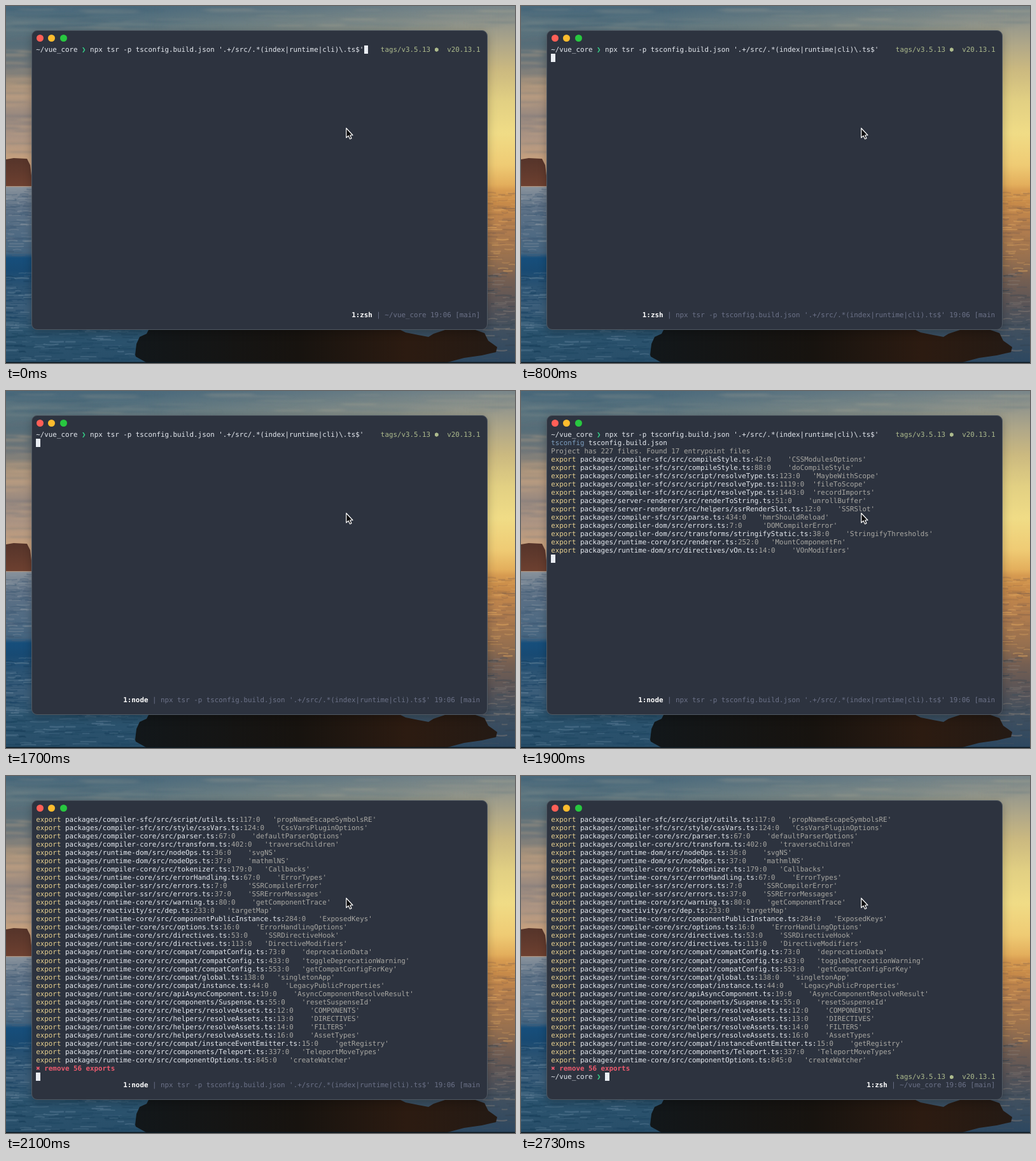
These frames come from a looping animation (800 px wide and 561 px high, 2.86 s). An HTML page:

```html
<!DOCTYPE html>
<html lang="en">
<head>
<meta charset="utf-8">
<title>Terminal session</title>
<style>
  html, body { margin: 0; width: 100%; height: 100%; overflow: hidden; background: #2d333f; }
  #stage { position: relative; width: 800px; height: 561px; overflow: hidden; }
  #stage > * { position: absolute; }
  .fill { inset: 0; }
  .cool { background: linear-gradient(#48687b 0, #5c757f 30px, #566d78 60px, #74797a 95px,
    #a5917b 122px, #b69a80 142px, #97887f 172px, #aa9383 205px, #c5a07e 240px, #bb9477 283px,
    #87919b 285px, #5d7186 320px, #456580 388px, #164e7b 396px, #184a73 415px, #2b5373 440px,
    #3b5d79 475px, #2c546f 510px, #284e69 561px); }
  .warm { background: linear-gradient(#78868a 0, #97988c 30px, #b1a888 62px, #cbb980 100px,
    #e2d083 150px, #f0dc86 200px, #efcb74 250px, #e3ae5c 281px, #d69a50 290px, #c78a49 310px,
    #b27d4e 350px, #956f4f 400px, #755f52 430px, #595457 470px, #3f4f5f 512px, #2c4760 561px);
    -webkit-mask-image: linear-gradient(90deg, transparent 25%, #000 97%);
    mask-image: linear-gradient(90deg, transparent 25%, #000 97%); }
  #window { left: 40px; top: 38px; width: 717px; height: 470.5px; box-sizing: border-box;
    border: 1px solid #505963; border-radius: 9px; background: #2d333f;
    box-shadow: 0 4px 14px rgba(0, 0, 0, .25); }
  .light { width: 11px; height: 11px; border-radius: 50%; top: 44.8px; }
  .screen { left: 47.3px; top: 61.7px; opacity: 0; color: #e6eaf0;
    font: 10.838px/13.05px "DejaVu Sans Mono", "Liberation Mono", monospace;
    text-rendering: geometricPrecision; font-variant-ligatures: none; }
  .screen, .screen span { position: absolute; white-space: pre; }
  .key { color: #e7d08f; }
  .note { color: #a9a8a3; }
  .blue { color: #7e9fc0; }
  .tag { color: #adbb8d; }
  .arrow { color: #35d48a; font-weight: bold; }
  .error { color: #ec5a6e; font-weight: bold; }
  .tab { color: #fff; font-weight: bold; }
  .dim { color: #6c7288; }
  .caret { width: 6.6px; height: 13.05px; background: #e9edf3; }
  .hex { width: 6px; height: 6.6px; margin-top: 3.6px; background: #adbb8d;
    clip-path: polygon(50% 0, 100% 25%, 100% 75%, 50% 100%, 0 75%, 0 25%); }
</style>
</head>
<body>
<div id="stage">
  <div class="fill cool"></div>
  <div class="fill warm"></div>
  <svg class="fill" width="800" height="561">
    <defs>
      <filter id="soft" x="-20%" y="-20%" width="140%" height="140%"><feGaussianBlur stdDeviation="5 1.6"/></filter>
      <linearGradient id="rock">
        <stop offset="0" stop-color="#12171a"/><stop offset=".45" stop-color="#17130f"/>
        <stop offset=".75" stop-color="#2c1b11"/><stop offset="1" stop-color="#241a14"/>
      </linearGradient>
      <linearGradient id="cliff" x1="0" y1="0" x2="0" y2="1">
        <stop offset="0" stop-color="#55342a"/><stop offset="1" stop-color="#6d4030"/>
      </linearGradient>
    </defs>
    <g id="clouds" fill="none" stroke-linecap="round" filter="url(#soft)"></g>
    <path d="M0 241L12 239L33 240L38 250L42 283H0Z" fill="url(#cliff)"/>
    <g id="waves" fill="none" stroke-linecap="round"></g>
    <path d="M203 548L205 531L210 520L221 515L226 505H612L628 513L648 517L664 520L672 515L690 509
      L735 508L752 514L758 526L772 536L770 544L748 549L720 553L690 561H222L204 551Z" fill="url(#rock)"/>
    <path d="M0 560.3H800" stroke="#0c1820" stroke-width="1.4"/>
  </svg>
  <div id="window"></div>
  <div class="light" style="left:48px;background:#ff5f57"></div>
  <div class="light" style="left:66.3px;background:#febc2e"></div>
  <div class="light" style="left:84.8px;background:#28c840"></div>
  <div id="screens" class="fill"></div>
  <svg style="left:533px;top:190px" width="14" height="22">
    <path d="M1.8 2V17L5.2 13.9L7.6 19L10 17.9L7.8 13H12Z" fill="#0b0b0d" stroke="#fff"
      stroke-width="1.2" stroke-linejoin="round"/>
  </svg>
</div>
<script>
const LOOP = 2860, CELL = 6.525, LINE = 13.05, COLS = 107, LAST_ROW = 31;
const SHELL = '~/vue_core';
const RUN = 'npx tsr -p tsconfig.build.json ';
const COMMAND = RUN + "'.+/src/.*(index|runtime|cli)\\.ts$'";
const TITLE = RUN + "'.+/src/.*(index|runtime|cli).ts$'";

// package, file, line, export name
const EXPORTS = `compiler-sfc compileStyle 42 CSSModulesOptions
compiler-sfc compileStyle 88 doCompileStyle
compiler-sfc script/resolveType 123 MaybeWithScope
compiler-sfc script/resolveType 1119 fileToScope
compiler-sfc script/resolveType 1443 recordImports
server-renderer renderToString 51 unrollBuffer
server-renderer helpers/ssrRenderSlot 12 SSRSlot
compiler-sfc parse 434 hmrShouldReload
compiler-dom errors 7 DOMCompilerError
compiler-dom transforms/stringifyStatic 38 StringifyThresholds
runtime-core renderer 252 MountComponentFn
runtime-dom directives/vOn 14 VOnModifiers
shared escapeHtml 53 cssVarNameEscapeSymbolsRE
shared globalsAllowList 11 isGloballyWhitelisted
shared normalizeProp 2 NormalizedStyle
compiler-core compat/compatConfig 5 CompilerCompatConfig
compiler-core transforms/vOn 18 VOnDirectiveNode
runtime-core components/BaseTransition 76 TransitionHookCaller
runtime-core components/BaseTransition 81 PendingCallback
runtime-core components/BaseTransition 92 TransitionElement
runtime-dom modules/attrs 13 xlinkNS
runtime-dom modules/attrs 53 compatCoerceAttr
runtime-dom modules/events 24 removeEventListener
shared general 65 toTypeString
compiler-sfc rewriteDefault 91 hasDefaultExport
compiler-sfc script/defineProps 31 PropTypeData
compiler-sfc script/utils 117 propNameEscapeSymbolsRE
compiler-sfc style/cssVars 124 CssVarsPluginOptions
compiler-core parser 67 defaultParserOptions
compiler-core transform 402 traverseChildren
runtime-dom nodeOps 36 svgNS
runtime-dom nodeOps 37 mathmlNS
compiler-core tokenizer 179 Callbacks
runtime-core errorHandling 67 ErrorTypes
compiler-ssr errors 7 SSRCompilerError
compiler-ssr errors 37 SSRErrorMessages
runtime-core warning 80 getComponentTrace
reactivity dep 233 targetMap
runtime-core componentPublicInstance 284 ExposedKeys
compiler-core options 16 ErrorHandlingOptions
runtime-core directives 53 SSRDirectiveHook
runtime-core directives 113 DirectiveModifiers
runtime-core compat/compatConfig 73 deprecationData
runtime-core compat/compatConfig 433 toggleDeprecationWarning
runtime-core compat/compatConfig 553 getCompatConfigForKey
runtime-core compat/global 138 singletonApp
runtime-core compat/instance 44 LegacyPublicProperties
runtime-core apiAsyncComponent 19 AsyncComponentResolveResult
runtime-core components/Suspense 55 resetSuspenseId
runtime-core helpers/resolveAssets 12 COMPONENTS
runtime-core helpers/resolveAssets 13 DIRECTIVES
runtime-core helpers/resolveAssets 14 FILTERS
runtime-core helpers/resolveAssets 16 AssetTypes
runtime-core compat/instanceEventEmitter 15 getRegistry
runtime-core components/Teleport 337 TeleportMoveTypes
runtime-core componentOptions 845 createWatcher`.split('\n');

// A line is a list of [text, class] parts laid out on the character grid.
const prompt = typed => {
  const left = SHELL.length + 3 + typed.length;
  return [[SHELL + ' '], ['❯', 'arrow'], [' ' + typed], [' '.repeat(COLS - 24 - left)],
    ['tags/v3.5.13 ', 'tag'], [' ', 'hex'], ['  v20.13.1', 'tag']];
};
const exportLine = row => {
  const [pkg, file, line, name] = row.split(' ');
  return [['export', 'key'], [` packages/${pkg}/src/${file}.ts:`],
    [`${line}:0`.padEnd(8) + `'${name}'`, 'note']];
};
const lines = [
  prompt(COMMAND),
  [['tsconfig', 'blue'], [' tsconfig.build.json']],
  [['Project has 227 files. Found 17 entrypoint files', 'note']],
  ...EXPORTS.map(exportLine),
  [['✖', 'error'], [' remove 56 exports', 'error']],
  prompt('')
];

// start time, lines shown, caret line, caret column, tab name, idle shell
const STEPS = [
  [0, 1, 0, 13 + COMMAND.length, 'zsh', true],
  [400, 1, 1, 0, 'zsh', false],
  [1600, 1, 1, 0, 'node', false],
  [1800, 3, 3, 0, 'node', false],
  [1900, 15, 15, 0, 'node', false],
  [2000, 45, 45, 0, 'node', false],
  [2100, 60, 60, 0, 'node', false],
  [2730, 61, 60, 13, 'zsh', true]
];

function put(screen, row, col, text, kind = '') {
  const span = document.createElement('span');
  span.className = kind;
  span.textContent = text;
  span.style.left = col * CELL + 'px';
  span.style.top = row * LINE + 'px';
  screen.append(span);
}

function putLine(screen, row, parts, col = 0) {
  for (const [text, kind] of parts) {
    if (text.trim() || kind) put(screen, row, col, text, kind);
    col += text.length;
  }
}

function makeScreen([, shown, caretLine, caretCol, tab, idle]) {
  const screen = document.createElement('div');
  screen.className = 'screen';
  const top = Math.max(0, caretLine - LAST_ROW);
  lines.slice(top, shown).forEach((line, row) => putLine(screen, row, line));
  put(screen, caretLine - top, caretCol, '', 'caret');

  const label = '1:' + tab;
  const info = idle ? ` | ${SHELL} 19:06 [main]` : ` | ${TITLE} 19:06 [main`;
  putLine(screen, LAST_ROW + 1, [[label, 'tab'], [info, 'dim']], COLS - label.length - info.length);
  return screen;
}

function showBetween(el, from, to) {
  const key = (opacity, time) => ({ opacity, offset: time / LOOP, easing: 'step-end' });
  el.animate([key(from ? 0 : 1, 0), key(1, from), key(0, to), key(0, LOOP)],
    { duration: LOOP, iterations: Infinity });
}

let seed = 11;
const rnd = () => (seed = seed * 16807 % 2147483647) / 2147483647;

// Scatters soft horizontal strokes over a box, each in one of the given colours.
function streaks(id, count, [x, y, w, h], length, colors) {
  let svg = '';
  for (let i = 0; i < count; i++) {
    const len = length * (.4 + rnd());
    const color = colors[Math.floor(rnd() * colors.length)];
    svg += `<path d="M${x + rnd() * w - len / 2} ${y + rnd() * h}q${len / 2} ${rnd() * 4 - 2} ${len} 0"
      stroke="${color}" stroke-width="${1 + rnd() * 1.6}" opacity="${.2 + rnd() * .3}"/>`;
  }
  document.getElementById(id).innerHTML += svg;
}

streaks('clouds', 40, [0, 4, 420, 34], 90, ['#3f5f72', '#7f8a8a']);
streaks('clouds', 24, [420, 4, 380, 34], 90, ['#6f8084', '#a8a591']);
streaks('clouds', 40, [0, 40, 40, 195], 40, ['#5f6d76', '#c4a586']);
streaks('waves', 90, [0, 287, 40, 105], 18, ['#8d98a3', '#3b5872', '#495f78']);
streaks('waves', 70, [0, 415, 40, 95], 18, ['#6d8aa0', '#153e5f', '#1c4566']);
streaks('waves', 90, [757, 292, 43, 130], 18, ['#e0a860', '#83614c', '#9c7049']);
streaks('waves', 60, [757, 420, 43, 135], 18, ['#8a8079', '#34424f', '#43505c']);
streaks('waves', 120, [0, 508, 205, 51], 22, ['#5f8099', '#173d58', '#1d4560']);

const holder = document.getElementById('screens');
STEPS.forEach((step, i) => {
  const screen = makeScreen(step);
  holder.append(screen);
  showBetween(screen, step[0], i + 1 < STEPS.length ? STEPS[i + 1][0] : LOOP);
});
</script>
</body>
</html>
```
